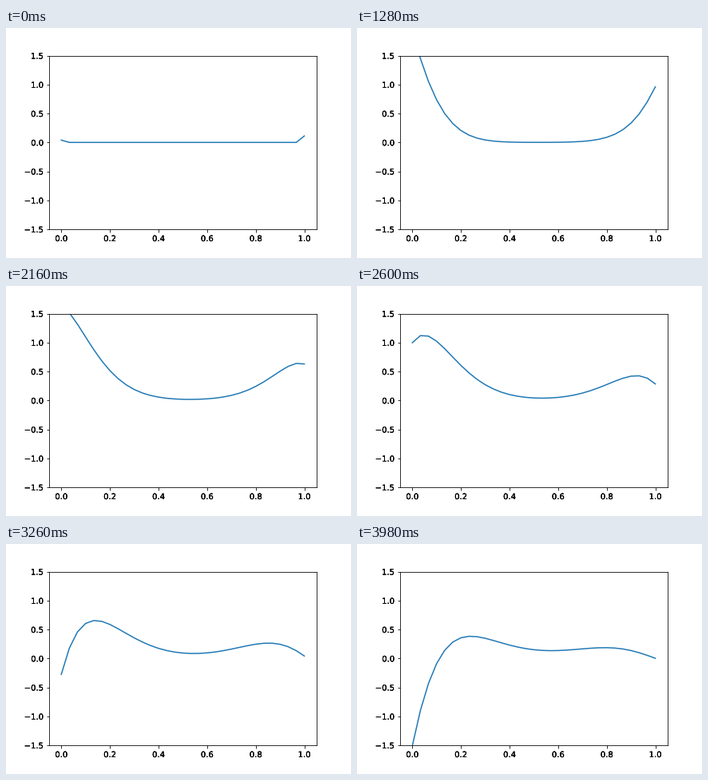
These frames come from a looping animation (432x288 px, 4000 ms). A matplotlib script:

```python
import numpy as np
import matplotlib.pyplot as plt
from matplotlib import patheffects
from matplotlib.animation import FuncAnimation

FRAMES = 200
INTERVAL = 20
NODES = 31
DT = 0.02
DIFFUSIVITY = 0.01

x = np.linspace(0, 1, NODES)
ratio = DIFFUSIVITY * DT / (x[1] - x[0]) ** 2


def solve():
    """Explicit heat equation with time-dependent end temperatures."""
    u = np.zeros(NODES)
    states = []
    for step in range(1, FRAMES + 1):
        t = step * DT
        u[1:-1] += ratio * (u[2:] - 2 * u[1:-1] + u[:-2])
        u[0] = 2 * np.sin(t)
        u[-1] = np.exp(-(t - 1.5) ** 2)
        states.append(u.copy())
    return states


states = solve()

plt.rcParams["font.family"] = "DejaVu Sans"
fig, ax = plt.subplots(figsize=(6, 4), dpi=72)
fig.subplots_adjust(left=0.125, right=0.9, bottom=0.125, top=0.88)
line, = ax.plot(x, states[0], color="#1f77b4", lw=1.5)
ax.set_xlim(-0.05, 1.05)
ax.set_ylim(-1.5, 1.5)

# Overprint the labels so their soft edges come out dark.
heavy = [patheffects.Normal()] * 3
for label in ax.get_xticklabels() + ax.get_yticklabels():
    label.set_path_effects(heavy)


def update(i):
    line.set_ydata(states[i])
    return line,


anim = FuncAnimation(fig, update, frames=FRAMES, interval=INTERVAL,
                     repeat=True, repeat_delay=0)
plt.show()
```
